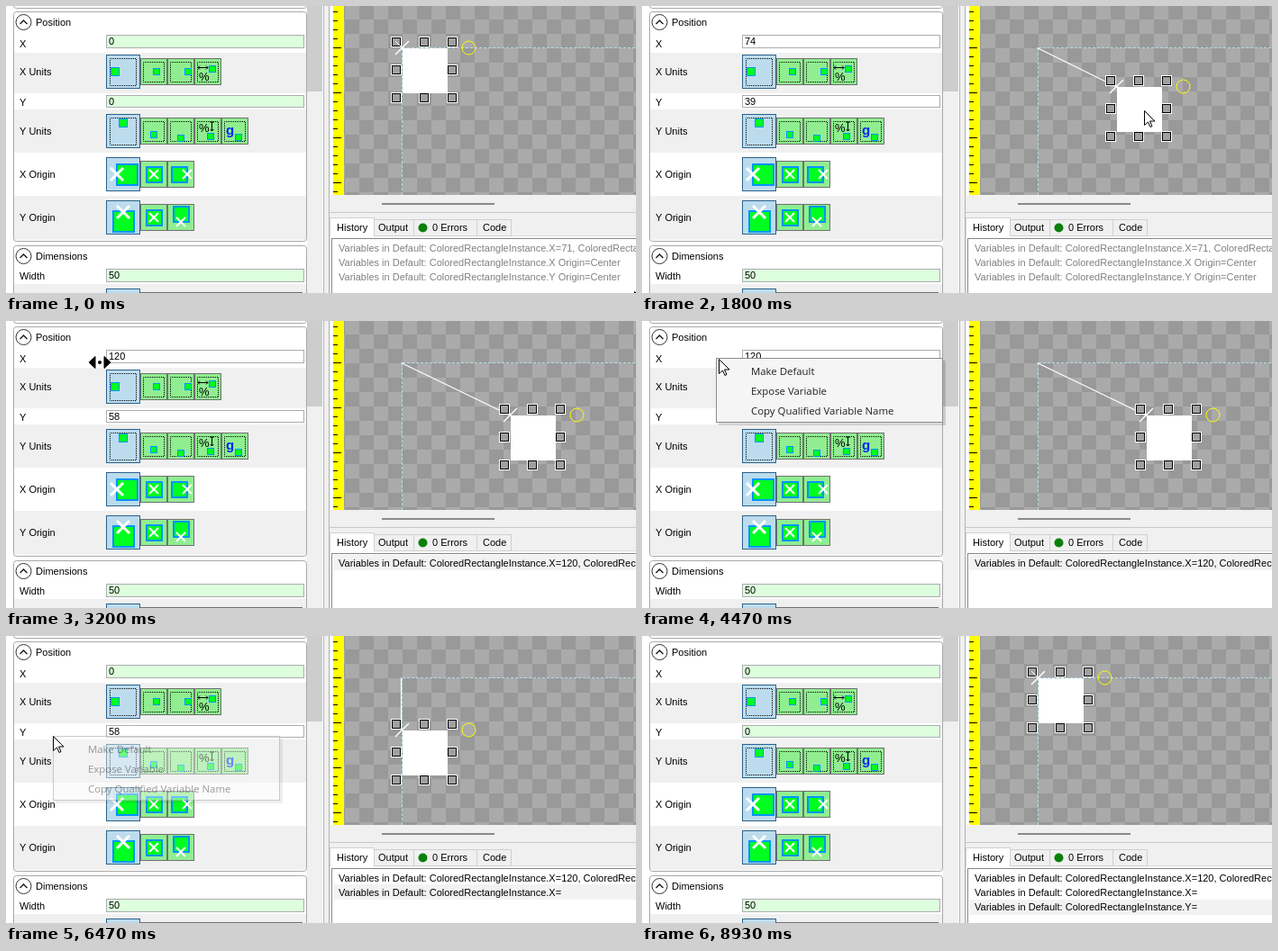
An HTML page with a canvas that plays this animation: 699x319 px, repeating every 9600 ms.

```html
<!DOCTYPE html>
<html lang="en">
<head>
<meta charset="utf-8">
<style>
html, body { margin: 0; width: 100%; height: 100%; overflow: hidden; background: #fff; }
canvas { display: block; }
</style>
</head>
<body>
<canvas id="stage" width="699" height="319"></canvas>
<script>
const ctx = document.getElementById('stage').getContext('2d');
const LOOP = 9600, STEP = 200 / 3;
const FAMILY = '"Liberation Sans", Arial, sans-serif';
const UI = '11px ' + FAMILY;
const MENU = '11.4px "Open Sans", sans-serif';
const GREEN = '#00ff21', BLUE = '#0094ff';
const ORIGIN = { x: 440, y: 47 };

// Keyframes: time, x, y
const dragPath = [[933, 0, 0], [1200, 16, 7], [1667, 74, 39], [1800, 87, 43],
  [1933, 103, 49], [2133, 117, 56], [2267, 120, 58]];
const approach = [[130, 697, 317], [330, 600, 215], [530, 505, 105], [730, 470, 73]];
const travel = [[2330, 590, 131], [2530, 470, 112], [2730, 280, 76], [2930, 178, 56],
  [3067, 140, 50], [3200, 104, 46], [3330, 88, 42], [3470, 82, 41],
  [4430, 82, 41], [4670, 100, 49], [4930, 110, 52], [5430, 110, 52],
  [5670, 84, 78], [6000, 52, 111], [6900, 52, 111], [7130, 76, 119], [7330, 90, 123],
  [8490, 90, 123], [8670, 56, 190], [8870, 10, 284]];
const menus = [
  { x: 82, y: 41, open: 3830, calm: 5060, close: 5060 },
  { x: 52, y: 111, open: 6400, calm: 7590, close: 7725 }
];

function along(path, t) {
  let i = 0;
  while (i < path.length - 1 && t >= path[i + 1][0]) i++;
  const a = path[i], b = path[i + 1] || a;
  const k = a === b ? 0 : Math.max(0, (t - a[0]) / (b[0] - a[0]));
  return { x: Math.round(a[1] + (b[1] - a[1]) * k), y: Math.round(a[2] + (b[2] - a[2]) * k) };
}

function box(x, y, w, h, fill, stroke) {
  if (fill) { ctx.fillStyle = fill; ctx.fillRect(x, y, w, h); }
  if (stroke) { ctx.strokeStyle = stroke; ctx.lineWidth = 1; ctx.strokeRect(x + .5, y + .5, w - 1, h - 1); }
}
function text(s, x, y, color = '#000', font = UI) {
  ctx.font = font; ctx.fillStyle = color; ctx.fillText(s, x, y);
}
function line(color, width, ...p) {
  ctx.strokeStyle = color; ctx.lineWidth = width;
  ctx.beginPath();
  for (let i = 0; i < p.length; i += 2) ctx.lineTo(p[i], p[i + 1]);
  ctx.stroke();
}
function dashed(color, dash, ...p) {
  ctx.setLineDash(dash); line(color, 1, ...p); ctx.setLineDash([]);
}
function cross(x, y, r, width) {
  line('#fff', width, x - r, y - r, x + r, y + r);
  line('#fff', width, x - r, y + r, x + r, y - r);
}
function circle(x, y, r, fill, stroke) {
  ctx.beginPath(); ctx.arc(x, y, r, 0, 7);
  if (fill) { ctx.fillStyle = fill; ctx.fill(); }
  if (stroke) { ctx.strokeStyle = stroke; ctx.lineWidth = 1; ctx.stroke(); }
}
function polygon(x, y, points, fill, stroke) {
  ctx.beginPath();
  for (let i = 0; i < points.length; i += 2) ctx.lineTo(x + points[i], y + points[i + 1]);
  ctx.closePath();
  ctx.lineWidth = 1; ctx.fillStyle = fill; ctx.strokeStyle = stroke;
  ctx.fill(); ctx.stroke();
}

function group(y, h, title) {
  ctx.beginPath(); ctx.roundRect(8.5, y + .5, 325, h, 3);
  ctx.strokeStyle = '#a8a8a8'; ctx.lineWidth = 1; ctx.stroke();
  if (!title) return;
  circle(19.5, y + 12, 8.5, '#fff', '#333');
  line('#222', 1.5, 15.5, y + 14, 19.5, y + 10, 23.5, y + 14);
  text(title, 33, y + 16);
}
function field(y, h, value, isDefault) {
  box(111, y, 220, h, isDefault ? '#ddffdd' : '#fff', '#abadb3');
  text(value, 114, y + 11);
}
function buttons(y, count) {
  box(111, y, 38, 38, '#bcdcee', '#2c628b');
  for (let i = 1; i < count; i++) box(119 + i * 30, y + 4, 30, 30, '#90ee90', '#707070');
}
function dots(x, y, w, h) {
  ctx.setLineDash([1, 1]);
  ctx.lineDashOffset = .5;
  box(x, y, w, h, null, '#000');
  ctx.lineDashOffset = 0;
  ctx.setLineDash([]);
}
function chip(x, y, size = 8) { box(x, y, size, size, GREEN, BLUE); }
function originIcon(x, y, size, cx, cy, r) {
  box(x, y, size, size, BLUE);
  box(x + 2, y + 2, size - 4, size - 4, GREEN);
  cross(cx, cy, r, r > 5 ? 3 : 2);
}
function doubleArrow(x1, y1, x2, y2) {
  const vertical = x1 === x2;
  line('#000', 1, x1, y1, x2, y2);
  for (const [x, y, d] of [[x1, y1, 2], [x2, y2, -2]])
    if (vertical) line('#000', 1, x - 2, y + d, x, y, x + 2, y + d);
    else line('#000', 1, x + d, y - 2, x, y, x + d, y + 2);
}

function properties(x, y) {
  for (const [top, h] of [[52, 45], [115, 48], [211, 49], [309, 10]]) box(9, top, 324, h, '#f0f0f0');
  group(-20, 22);
  group(6, 255, 'Position');
  group(266, 80, 'Dimensions');
  [['X', 42], ['X Units', 73], ['Y', 107], ['Y Units', 139], ['X Origin', 187], ['Y Origin', 235], ['Width', 300]]
    .forEach(([s, c]) => text(s, 15, c + 4));
  field(32, 15, x, !x);
  field(99, 14, y, !y);
  field(292, 15, 50, true);

  buttons(54, 4);
  buttons(120, 5);
  buttons(168, 3);
  buttons(216, 3);
  buttons(314, 7);
  for (const top of [54, 120]) {
    dots(115, top + 4, 30, 31);
    for (const left of [152, 182, 212]) dots(left, top + 8, 24, 23);
  }
  dots(242, 128, 24, 23);
  chip(116, 68, 10); chip(163, 69); chip(198, 69); chip(225, 66);
  chip(125, 125, 10); chip(160, 139); chip(190, 143); chip(223, 141); chip(254, 142);
  text('%', 214, 83, '#000', '13px ' + FAMILY);
  text('%', 214, 140, '#000', '13px ' + FAMILY);
  doubleArrow(213, 68.5, 224, 68.5);
  doubleArrow(228.5, 128, 228.5, 139);
  text('g', 244, 143, '#0026ff', 'bold 15px ' + FAMILY);
  originIcon(122, 175, 25, 123, 187, 7);
  originIcon(155, 178, 19, 164, 187, 5);
  originIcon(183, 178, 19, 201, 187, 5);
  originIcon(118, 227, 25, 130, 229, 7);
  originIcon(155, 226, 19, 164, 235, 5);
  originIcon(185, 222, 19, 194, 240, 5);

  box(334, 0, 17, 319, '#f0f0f0');
  box(334, 0, 17, 95, '#cdcdcd');
  box(352, 0, 8, 319, '#f0f0f0');
  box(352, 0, 1, 319, '#b4b4b4');
  box(358, 0, 1, 319, '#b4b4b4');
}

function canvasView(dx, dy) {
  ctx.save();
  ctx.beginPath(); ctx.rect(363, 0, 336, 210); ctx.clip();
  for (let row = 0; row < 14; row++)
    for (let col = 0; col < 22; col++)
      box(360 + col * 16, row * 16 - 1, 16, 16, (row + col) % 2 ? '#aaa' : '#999');
  box(363, 0, 12, 210, '#ffff00');
  for (let y = 6; y < 210; y += 10) box(363, y, (y - 46) % 50 ? 5 : 9, 1, '#000');

  dashed('#b4dcea', [3, 2], 440, 46.5, 699, 46.5);
  dashed('#b4dcea', [3, 2], 439.5, 47, 439.5, 210);
  const x = ORIGIN.x + dx, y = ORIGIN.y + dy;
  box(x, y, 50, 50, '#fff');
  line('#fff', 1.2, 438.5, 46.5, x - 1.5, y - .5);
  cross(x - .5, y - .5, 7.5, 1.5);
  circle(x + 73.5, y - .5, 7.5, null, '#ffff00');
  for (const hx of [-7, 24, 55]) for (const hy of [-7, 24, 55]) {
    if (hx === 24 && hy === 24) continue;
    box(x + hx - 6, y + hy - 6, 12, 12, '#a0a0a0', '#fff');
    box(x + hx - 5, y + hy - 5, 10, 10, null, '#000');
  }
  if (!dx && !dy) line('#fff', 1, x - 8, y - 8, x, y);
  ctx.restore();
}

function history(t, pointer) {
  box(359, 210, 340, 109, '#f0f0f0');
  box(417, 219, 125, 2, '#8a8a8a');
  box(359, 229, 340, 1, '#c8c8c8');
  box(359, 255, 341, 65, '#fff', '#dcdcdc');
  for (const [x, w] of [[408, 45], [452, 71], [522, 39]]) box(x, 237, w, 19, '#f0f0f0', '#d0d0d0');
  box(359, 235, 50, 21, '#fff', '#d0d0d0');
  box(360, 255, 48, 1, '#fff');
  text('History', 367, 250);
  text('Output', 413, 250);
  circle(462.5, 246.5, 5, '#0a800a');
  text('0 Errors', 473, 250);
  text('Code', 529, 250);
  box(361, 258, 345, 70, '#fff', '#828790');

  const name = 'ColoredRectangleInstance', undone = t < 2330;
  const rows = undone
    ? [`X=71, ${name}.Y=36`, 'X Origin=Center', 'Y Origin=Center']
    : [`X=120, ${name}.Y=58`, 'X=', 'Y='].slice(0, t < 5060 ? 1 : t < 7725 ? 2 : 3);
  rows.forEach((row, i) => {
    const top = Math.floor(260 + i * 16.5);
    const hover = undone && pointer.y >= top && pointer.y < top + 17;
    if (hover) box(363, top, 340, 17, '#e4f3fb', '#a8d9f0');
    else if (!undone && i === rows.length - 1) box(363, top, 340, 17, '#f2f2f2');
    text(`Variables in Default: ${name}.${row}`, 369, 273 + i * 16, undone ? '#808080' : '#000');
  });
}

function contextMenu(menu, t, pointer) {
  const { x, y } = menu, shadow = 'rgba(0,0,0,.15)';
  ctx.save();
  ctx.globalAlpha = Math.min(1, (t - menu.open) / 150);
  box(x + 252, y + 3, 3, 72, shadow);
  box(x + 3, y + 72, 249, 3, shadow);
  box(x, y, 252, 72, '#f5f5f5', '#8c8c8c');
  if (t < menu.calm && pointer.x > x + 3 && pointer.y > y + 4)
    box(x + 3, y + 4, 245, 22, 'rgba(38,160,218,.24)', '#26a0da');
  ['Make Default', 'Expose Variable', 'Copy Qualified Variable Name']
    .forEach((s, i) => text(s, x + 39, y + 19 + i * 22, '#212121', MENU));
  ctx.restore();
}

function cursor({ x, y }, menuOpen) {
  const inRow = (y > 31 && y < 51) || (y > 97 && y < 115);
  if (!menuOpen && inRow && x < 111) {
    for (const s of [-1, 1]) polygon(x, y, [12 * s, 0, 5 * s, -6.5, 5 * s, 6.5], '#000', '#000');
    circle(x, y, 2, '#000');
  } else if (!menuOpen && inRow && x < 331) {
    line('#000', 1, x + .5, y - 8, x + .5, y + 8);
    for (const d of [-8, 8]) line('#000', 1, x - 3, y + d + .5, x + 4, y + d + .5);
  } else {
    polygon(x + .5, y + .5, [0, 0, 0, 16, 4, 12.5, 6.5, 18, 8.5, 17, 6, 11.5, 11.5, 11.5], '#fff', '#000');
  }
}

function draw(now) {
  const t = Math.floor((now % LOOP + 4) / STEP) * STEP;
  const drag = along(dragPath, t);
  const shown = along(dragPath, t - 2 * STEP); // fields lag behind the drag
  for (const p of [drag, shown]) {
    if (t >= 5060) p.x = 0;
    if (t >= 7725) p.y = 0;
  }
  let pointer = t < 933 ? along(approach, t) : along(travel, t);
  if (t >= 933 && t < 2330) pointer = { x: 470 + drag.x, y: 73 + drag.y };
  const menu = menus.find(m => t > m.open && t < m.close);

  box(0, 0, 699, 319, '#fff');
  properties(shown.x, shown.y);
  canvasView(drag.x, drag.y);
  history(t, pointer);
  if (menu) contextMenu(menu, t, pointer);
  if (t < 8900) cursor(pointer, menu);
}

const start = performance.now();
(function tick() {
  draw(performance.now() - start);
  requestAnimationFrame(tick);
})();
</script>
</body>
</html>
```
